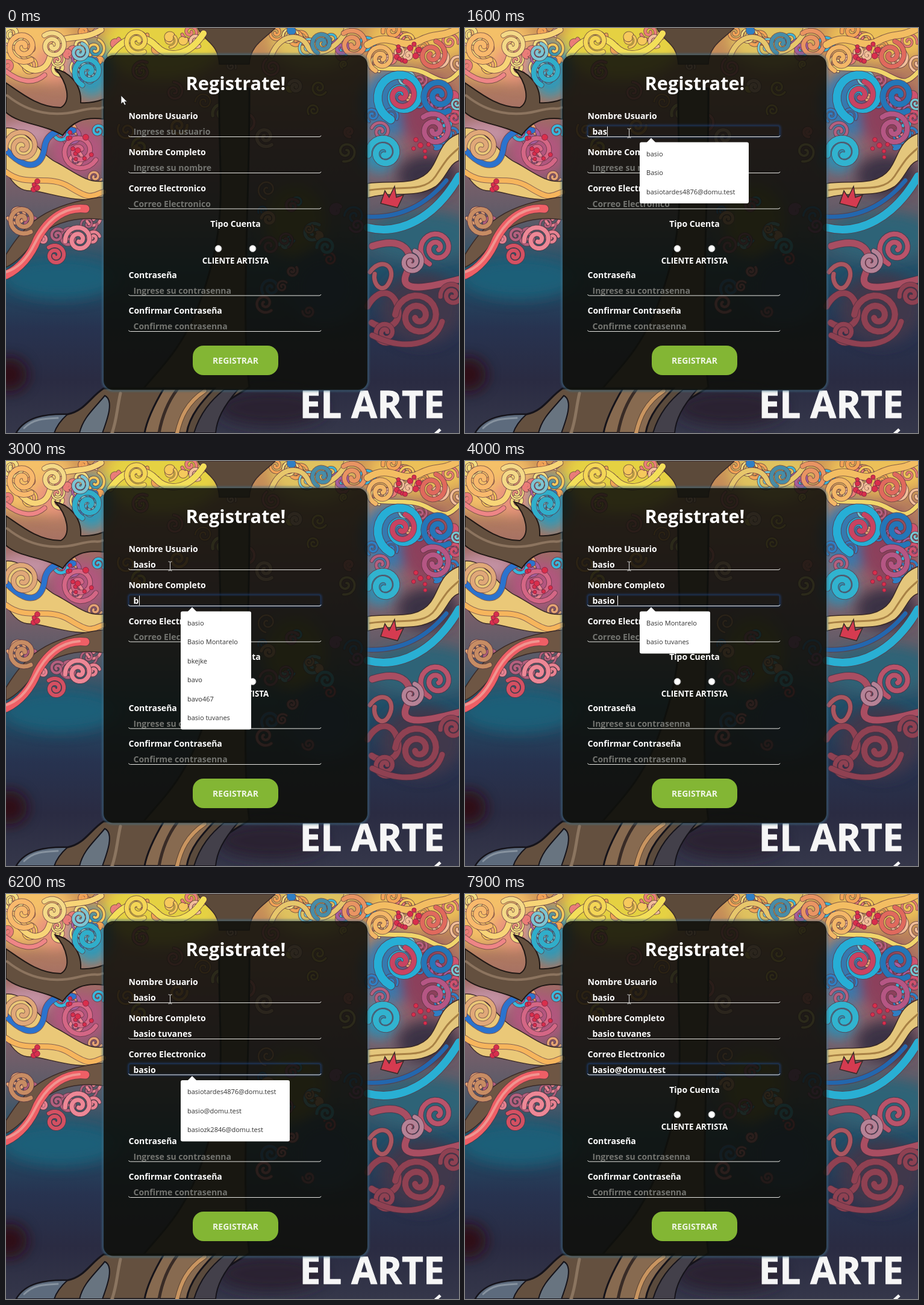
Write an HTML page that moves like this. It is 752 px wide and 672 px high and loops after 8 s.

```html
<!DOCTYPE html>
<html lang="es">
<head>
<meta charset="utf-8">
<title>Registro</title>
<style>
  html, body { margin: 0; width: 100%; height: 100%; overflow: hidden; background: #25304a; }
  svg { display: block; }
  text { font: 700 14px "Open Sans", "Noto Sans", sans-serif; fill: #fff; white-space: pre; }
  .mid { text-anchor: middle; }
  .title { font-size: 30.7px; }
  .small { font-size: 13.3px; }
  .banner { font-size: 62px; fill: #f6f6f6; stroke: #f6f6f6; stroke-linejoin: round; }
  .hint { fill: #737470; }
  .option { font-size: 11px; font-weight: 400; fill: #333; }
</style>
</head>
<body>
<svg id="stage" width="752" height="672" viewBox="0 0 752 672">
  <defs>
    <linearGradient id="sky" x1="0" y1="0" x2="0" y2="1">
      <stop offset="0" stop-color="#cf9655"/>
      <stop offset=".28" stop-color="#95626a"/>
      <stop offset=".48" stop-color="#5a5b68"/>
      <stop offset=".6" stop-color="#215069"/>
      <stop offset=".74" stop-color="#273350"/>
      <stop offset=".87" stop-color="#2a2b42"/>
      <stop offset="1" stop-color="#35374a"/>
    </linearGradient>
    <filter id="soft" x="-50%" y="-50%" width="200%" height="200%"><feGaussianBlur stdDeviation="11"/></filter>
    <filter id="paint"><feGaussianBlur stdDeviation=".7"/></filter>
    <filter id="glow" x="-10%" y="-60%" width="120%" height="220%"><feGaussianBlur stdDeviation="1.6"/></filter>
  </defs>
  <rect width="752" height="672" fill="url(#sky)"/>
  <g id="art" filter="url(#paint)"></g>
  <text class="banner" x="487.500" y="647">EL ARTE</text>
  <path d="M711 675L721 666" stroke="#f6f6f6" stroke-width="5"/>

  <rect x="161" y="44" width="440" height="557.500" rx="17" fill="none" stroke="#3f6f86" stroke-width="4" stroke-opacity=".55" filter="url(#glow)"/>
  <rect x="162" y="45" width="438" height="555.500" rx="16" fill="#0f100c" fill-opacity=".88"/>
  <text class="title mid" x="381.500" y="103">Registrate!</text>
  <g id="form"></g>
  <text class="mid" x="381" y="330">Tipo Cuenta</text>
  <circle cx="352.500" cy="366" r="5.500" fill="#fff" stroke="#999"/>
  <circle cx="409.500" cy="366" r="5.500" fill="#fff" stroke="#999"/>
  <text class="small mid" x="381" y="390.500">CLIENTE ARTISTA</text>
  <rect x="310" y="527" width="142" height="49" rx="18" fill="#83b634"/>
  <text class="mid" x="381" y="556.500" fill-opacity=".88">REGISTRAR</text>

  <g id="ring" fill="none">
    <rect x="203" y="-19" width="320.500" height="19.500" rx="4" stroke="#1c4890" stroke-width="2" stroke-opacity=".6" filter="url(#glow)"/>
    <rect x="203.500" y="-18.500" width="319" height="18.500" rx="3" stroke="#1f3c66" stroke-opacity=".7"/>
  </g>
  <g id="lines" fill="none" stroke="#e8e8e4"></g>
  <rect id="caret" width="1" height="16" fill="#fff"/>
  <g id="popup">
    <path d="M301.500 9.500L309 2L316.500 9.500Z" fill="#fff"/>
    <rect id="sheet" x="290" y="9" rx="3" fill="#fff"/>
    <g id="options"></g>
  </g>
  <path id="arrow" d="M0 0V14L3.300 11L5.700 16L8 15L5.800 10.200H10Z" fill="#fff" stroke="#222" stroke-width=".8"/>
  <path id="beam" d="M-3 -7.500H-1L0 -6.500L1 -7.500H3M0 -6.500V6.500M-3 7.500H-1L0 6.500L1 7.500H3" fill="none" stroke="#ddd"/>
</svg>
<script>
const LOOP = 8000, STEP = 100;
const $ = id => document.getElementById(id);

function add(parent, tag, attrs, text) {
  const node = document.createElementNS("http://www.w3.org/2000/svg", tag);
  for (const key in attrs) node.setAttribute(key, attrs[key]);
  if (text !== undefined) node.textContent = text;
  parent.append(node);
  return node;
}

// ---- Painted tree behind the form ----
const art = $("art");
let seed = 17;
const random = () => (seed = seed * 16807 % 2147483647) / 2147483647;
const pick = list => list[Math.floor(random() * list.length)];

const haze = (color, cx, cy, rx, ry) =>
  add(art, "ellipse", { cx, cy, rx, ry, fill: color, filter: "url(#soft)" });
const shape = (color, d, line = "#3a2a28", width = 1.5) =>
  add(art, "path", { d, fill: color, stroke: line, "stroke-width": width });
function ribbon(color, width, d, line = "#5a3540") {
  const style = { d, fill: "none", "stroke-linecap": "round" };
  add(art, "path", { ...style, stroke: line, "stroke-width": width + 2, "stroke-opacity": .7 });
  add(art, "path", { ...style, stroke: color, "stroke-width": width });
}
function curl(color, x, y, r, width, angle = 0, turns = 1.8, line) {
  let d = "";
  for (let i = 0; i <= 44; i++) {
    const k = i / 44, a = angle + k * turns * 6.283, s = r * (1 - .85 * k);
    d += (i ? "L" : "M") + (x + s * Math.cos(a)).toFixed(1) + " " + (y + s * Math.sin(a)).toFixed(1);
  }
  ribbon(color, width, d, line);
}
function scatter(count, x, y, w, h, colors) {
  for (let i = 0; i < count; i++)
    curl(pick(colors), x + random() * w, y + random() * h, 6 + random() * 12,
      2.5 + random() * 3, random() * 6.3, (random() < .5 ? -1 : 1) * 1.5);
}
function berries(count, x, y, spread) {
  for (let i = 0; i < count; i++)
    add(art, "circle", { cx: x + (random() - .5) * spread, cy: y + (random() - .5) * spread,
      r: 3 + random() * 2, fill: "#d92f4c", stroke: "#8e2444" });
}

const WARM = ["#f6c95c", "#f3a456", "#f3de82", "#ea7d78", "#f2bf9a"];
const COOL = ["#38b8dc", "#2f7fc4", "#76cbd5", "#a75e9e"];
const ROSE = ["#cf526f", "#e88291", "#b5607f", "#e5a473"];

haze("#f4c067", 35, 30, 80, 55);
haze("#e8917e", 85, 60, 40, 30);
haze("#e5d143", 260, 25, 100, 60);
haze("#dfc25f", 510, 20, 70, 50);
haze("#ecc058", 690, 15, 90, 40);
haze("#2b9abb", 142, 70, 32, 45);
haze("#c493a4", 35, 175, 50, 22);
haze("#b3567f", 120, 205, 46, 40);
haze("#347ab0", 640, 125, 50, 55);
haze("#8c3f5c", 700, 140, 45, 60);
haze("#2c8fb4", 620, 210, 30, 30);
haze("#3b3344", 700, 245, 50, 35);
haze("#1c5f78", 90, 415, 95, 35);
haze("#2e6377", 690, 345, 90, 40);
haze("#40384c", 690, 465, 70, 60);
haze("#2d1119", 5, 575, 30, 28);
haze("#2c2233", 440, 630, 90, 30);
haze("#827a36", 480, 320, 50, 60);
haze("#28476f", 530, 430, 60, 60);

scatter(16, 0, 0, 160, 75, WARM);
scatter(7, 115, 45, 45, 60, COOL);
scatter(9, 180, 4, 150, 35, WARM);
scatter(12, 440, 4, 160, 40, WARM.concat(COOL));
scatter(15, 604, 0, 148, 60, WARM);
scatter(20, 604, 75, 148, 125, COOL.concat(ROSE));
scatter(9, 90, 170, 70, 80, ROSE.concat(COOL));
scatter(9, 0, 285, 150, 75, ROSE);
scatter(22, 190, 60, 390, 150, WARM);
scatter(22, 420, 250, 170, 230, COOL.concat(ROSE));

// left side
shape("#eac878", "M0 166C36 163 54 210 86 224C112 238 134 258 162 254V282C118 292 72 273 44 270C25 272 12 260 0 238Z");
ribbon("#2b73ce", 9, "M0 202C38 242 60 229 64 198C67 174 91 166 112 170");
ribbon("#f6b55c", 8, "M0 239C35 266 69 241 106 264S142 278 162 272");
shape("#64503f", "M0 91C25 108 54 132 91 132C109 122 102 90 82 68C101 72 126 90 124 124C139 125 149 123 162 118V151C128 147 110 156 94 178C63 159 22 160 0 140Z", "#201815", 2);
ribbon("#8c745f", 4, "M2 112C40 143 82 147 119 138S148 137 160 132", "#64503f");
ribbon("#f7d477", 9, "M0 34C20 42 31 77 55 69C81 62 68 28 91 20S130 20 158 3");
ribbon("#ee8586", 7, "M0 72C23 90 46 94 64 78");
curl("#f8b96c", 28, 31, 26, 8, 1);
curl("#f4d987", 78, 29, 22, 7, 4);
curl("#30aeca", 137, 72, 25, 8, 2);
curl("#7cc5d3", 122, 40, 15, 5, 5);
curl("#e0a878", 27, 197, 28, 7, 3);
curl("#d46685", 122, 204, 31, 7, .5);
berries(10, 123, 196, 46);
berries(4, 46, 264, 20);
shape("#6e5644", "M0 376C31 325 65 292 162 280V318C113 311 78 324 51 348C35 371 19 388 0 397Z");
ribbon("#ef5f66", 13, "M132 300C100 296 70 316 52 350C42 377 23 399 0 410");
ribbon("#f09590", 4, "M122 299C86 301 63 327 48 357S18 399 0 405", "#ef5f66");
curl("#ed8796", 121, 351, 23, 7, 3);
curl("#c78c63", 28, 318, 24, 7, 1);
curl("#d45062", 82, 377, 17, 6, 4);

// crown above the form
shape("#5c4a3a", "M318 0C330 24 352 24 354 60H404C405 28 430 18 447 0Z");
ribbon("#f3df59", 10, "M173 46C198 11 229 9 249 30S303 48 328 9");
ribbon("#e7c66b", 8, "M441 45C455 8 491 8 501 31S556 32 566 0");
curl("#f4d656", 218, 22, 21, 7, 1);
curl("#478da8", 525, 25, 18, 6, 2);
curl("#e99462", 576, 27, 24, 7, 4);

// right side
ribbon("#f3bd62", 11, "M600 28C639 3 654 38 685 22S721 18 752 0");
ribbon("#f0d56b", 7, "M606 65C645 71 670 62 698 76S732 95 752 73");
curl("#26aed6", 657, 112, 44, 13, 2, 1.6);
curl("#c94361", 656, 112, 24, 8, 5, 1.5);
curl("#2476b8", 719, 112, 30, 9, 1);
curl("#b55684", 711, 169, 28, 8, 4);
curl("#31b3cf", 628, 207, 27, 10, 3);
curl("#f3b767", 623, 50, 23, 7, 2);
curl("#e0695d", 707, 45, 24, 7, 5);
berries(10, 668, 45, 48);
berries(6, 693, 199, 34);
shape("#e4c67c", "M600 258C641 252 683 264 705 234C720 213 720 187 752 175V220C735 225 731 250 713 263C678 285 641 269 600 282Z");
ribbon("#a88145", 3, "M604 269C650 261 694 275 713 246S733 215 752 199", "#e4c67c");
ribbon("#29afd3", 13, "M600 331C655 345 713 314 752 246");
ribbon("#2367ae", 7, "M600 313C657 316 700 290 731 253");
shape("#d53b50", "M622 291L629 270L636 281L645 263L648 281L660 277L650 298Z");
const RED = "#8f4152", ROOT = "#4f3040";
ribbon(RED, 10, "M600 462C617 432 642 433 650 462S633 506 607 489", ROOT);
ribbon("#a94e62", 11, "M608 362C660 345 681 371 665 407S708 429 752 417", ROOT);
ribbon("#a95660", 7, "M604 405C623 379 648 395 637 420S608 425 612 408", ROOT);
curl(RED, 684, 478, 38, 10, 3.2, 1.9, ROOT);
curl("#b9536a", 715, 365, 29, 8, 2, 1.8, ROOT);
curl("#b58296", 673, 388, 19, 7, 5, 1.8, ROOT);
curl(RED, 630, 505, 19, 7, 1, 1.8, ROOT);
curl(RED, 741, 443, 20, 7, 3, 1.8, ROOT);
ribbon(RED, 9, "M608 510C660 536 713 527 724 487", ROOT);

// trunk and roots
const INK = "#15131a";
shape("#5a4a3c", "M354 100C352 260 373 320 319 462C286 546 247 570 211 620L190 672H320C339 632 367 620 404 596C389 480 405 280 404 100Z", INK, 3);
shape("#64503f", "M162 598C140 612 130 636 102 641C64 640 32 646 17 672H236C238 646 252 620 264 598Z", INK, 3);
shape("#5d6b7d", "M17 672C32 646 64 640 102 641C92 650 84 660 80 672Z", INK, 2);
shape("#687480", "M122 672C128 646 146 632 164 610C180 618 168 650 160 672Z", INK, 2);
ribbon("#8b7560", 5, "M190 606C184 632 184 650 176 672", "#64503f");
shape("#876a50", "M262 598C246 625 234 650 230 672H300C305 640 330 615 346 598Z", INK, 3);
ribbon("#c99560", 6, "M330 602C300 622 290 646 284 672", "#493426");
ribbon("#3a2b25", 3, "M284 600C266 624 258 650 254 672", INK);
ribbon("#8793a0", 3, "M30 664C46 648 64 648 86 647", "#5d6b7d");
shape("#43404a", "M312 672C322 639 340 618 362 600L385 600C360 629 350 649 348 672Z", INK, 2);

// ---- Form ----
const steps = (count, from, gap) => Array.from({ length: count }, (_, i) => from + i * gap);
const fields = [
  { label: "Nombre Usuario", hint: "Ingrese su usuario", line: 180.5, focus: 950,
    text: "basio", keys: steps(5, 1400, 95),
    options: ["basio", "Basio", "basiotardes4876@domu.test"] },
  { label: "Nombre Completo", hint: "Ingrese su nombre", line: 240.5, focus: 2700,
    text: "basio tuvanes", keys: [2950, ...steps(4, 3100, 100), ...steps(8, 4000, 180)],
    options: ["basio", "Basio Montarelo", "bkejke", "bavo", "bavo467", "basio tuvanes"] },
  { label: "Correo Electronico", hint: "Correo Electronico", line: 300, focus: 5400,
    text: "basio@domu.test", keys: [...steps(5, 5450, 50), ...steps(10, 6400, 100)],
    options: ["basiotardes4876@domu.test", "basio@domu.test", "basiozk2846@domu.test"] },
  { label: "Contraseña", hint: "Ingrese su contrasenna", line: 444, focus: Infinity, text: "", keys: [] },
  { label: "Confirmar Contraseña", hint: "Confirme contrasenna", line: 503.5, focus: Infinity, text: "", keys: [] }
];
for (const field of fields) {
  add($("form"), "text", { x: 203.5, y: field.line - 29.5 }, field.label);
  const box = add($("form"), "svg", { x: 203, y: field.line - 20, width: 320, height: 20 });
  field.node = add(box, "text", { x: 8.5, y: 16.5 });
  add($("lines"), "path", { d: `M203.500 ${field.line - 2}q.5 2 3 2H520q2.500 0 3 -2` });
}

const show = (node, on) => node.setAttribute("visibility", on ? "visible" : "hidden");
const place = (node, x, y) => node.setAttribute("transform", `translate(${x} ${y})`);
const typed = (field, t) => field.keys.filter(k => k <= t).length;

function drawPopup(field, value) {
  const matches = value ? field.options.filter(o => o.toLowerCase().startsWith(value)) : [];
  const open = matches.length > 1 || (matches.length === 1 && matches[0] !== value);
  show($("popup"), open);
  if (!open) return;
  place($("popup"), 0, field.line);
  $("options").replaceChildren();
  const widths = matches.map((option, i) =>
    add($("options"), "text", { class: "option", x: 301, y: 32 + i * 31.5 }, option).getComputedTextLength());
  $("sheet").setAttribute("width", Math.round(Math.max(...widths) + 33));
  $("sheet").setAttribute("height", matches.length * 31.5 + 7);
}

function drawPointer(t) {
  const k = Math.min(1, Math.max(0, (t - 100) / 700)), e = k * k * (3 - 2 * k);
  const x = 191 + 81.5 * e, y = 112 + 62.5 * e;
  const overText = y > 162 || (y > 138 && y < 154 && x > 203);
  show($("arrow"), !overText);
  show($("beam"), overText);
  place($("arrow"), x, y);
  place($("beam"), x, y);
}

function render(t) {
  for (const field of fields) {
    const value = field.text.slice(0, typed(field, t));
    field.node.textContent = value || field.hint;
    field.node.setAttribute("class", value ? "" : "hint");
  }
  const active = fields.filter(f => f.focus <= t).pop();
  for (const id of ["ring", "caret", "popup"]) show($(id), active);
  if (active) {
    const count = typed(active, t);
    const since = t - (count ? active.keys[count - 1] : active.focus);
    place($("ring"), 0, active.line);
    $("ring").setAttribute("opacity", Math.min(1, (t - active.focus) / 150));
    const width = count ? active.node.getComputedTextLength() : 0;
    place($("caret"), Math.round(212 + width), active.line - 17);
    show($("caret"), since % 1000 < 500);
    drawPopup(active, active.text.slice(0, count));
  }
  drawPointer(t);
}

const start = performance.now();
let last = -1;
function tick() {
  const t = Math.floor((performance.now() - start) % LOOP / STEP) * STEP;
  if (t !== last) render(last = t);
  requestAnimationFrame(tick);
}
tick();
</script>
</body>
</html>
```
